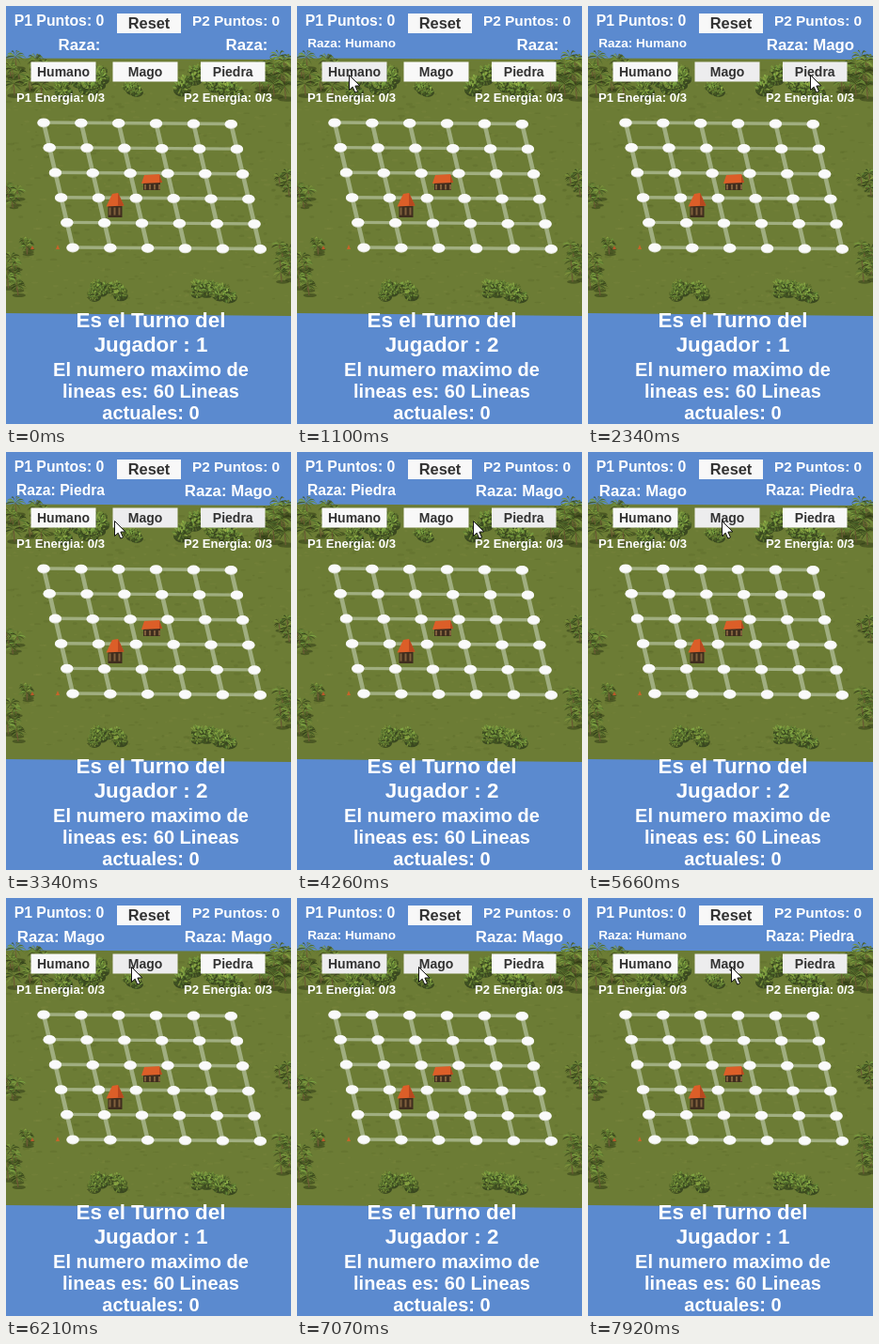
Write an HTML page with a canvas that moves like this. It is 303x445 px and loops after 8000 ms.

```html
<!DOCTYPE html>
<html lang="es">
<head>
<meta charset="utf-8">
<title>Puntos y lineas</title>
<style>
  html, body { margin: 0; width: 100%; height: 100%; overflow: hidden; background: #5b8acf; }
  canvas { display: block; width: 303px; height: 445px; }
</style>
</head>
<body>
<canvas id="stage"></canvas>
<script>
const W = 303, H = 445, LOOP = 8000, TICK = 77;
const SKY = '#5b8acf';
const ratio = window.devicePixelRatio || 1;

function setup(canvas) {
  canvas.width = W * ratio;
  canvas.height = H * ratio;
  const c = canvas.getContext('2d');
  c.scale(ratio, ratio);
  return c;
}

const ctx = setup(document.getElementById('stage'));
const scenery = document.createElement('canvas');

let seed = 11;
const random = () => (seed = (seed * 16807) % 2147483647) / 2147483647;
const between = (a, b) => a + (b - a) * random();

function polygon(c, fill, ...points) {
  c.beginPath();
  for (let i = 0; i < points.length; i += 2) c.lineTo(points[i], points[i + 1]);
  c.closePath();
  c.fillStyle = fill;
  c.fill();
}

function ellipse(c, fill, x, y, rx, ry, angle = 0) {
  c.beginPath();
  c.ellipse(x, y, rx, ry, angle, 0, 7);
  c.fillStyle = fill;
  c.fill();
}

// --- Scenery ---------------------------------------------------------

const leafColor = light => `hsl(${between(74, 88)}, 42%, ${17 + light * 29}%)`;

function palm(c, x, y, r) {
  ellipse(c, 'rgba(35,45,15,.45)', x + 2, y + r, r * .7, r * .2);
  c.strokeStyle = '#6b5a35';
  c.lineWidth = 1.2;
  c.beginPath();
  c.moveTo(x, y);
  c.lineTo(x + 1, y + r);
  c.stroke();
  const fronds = 15;
  for (let i = 0; i < fronds; i++) {
    const angle = i / fronds * Math.PI * 2 + between(-.2, .2);
    const dx = Math.cos(angle) * r * between(.7, 1.05);
    const dy = Math.sin(angle) * r * .6;
    c.beginPath();
    c.moveTo(x, y);
    c.quadraticCurveTo(x + dx * .6, y + dy - r * .3, x + dx, y + dy + r * .2);
    c.quadraticCurveTo(x + dx * .6, y + dy + 1.5 - r * .2, x, y);
    c.fillStyle = leafColor(random());
    c.fill();
  }
}

function bush(c, x, y, r) {
  ellipse(c, '#3a4820', x + 1, y + r * .25, r, r * .7);
  const leaves = 44;
  for (let i = 0; i < leaves; i++) {
    const angle = between(0, Math.PI * 2), reach = Math.sqrt(random()) * r;
    const dy = Math.sin(angle) * reach * .75;
    ellipse(c, leafColor(random() * .75 + .25 - dy / r * .25),
      x + Math.cos(angle) * reach, y + dy, r * .2, r * .09, angle);
  }
}

// Plants scattered in a box, the far ones first.
function grove(c, plant, x, y, w, h, count, size) {
  for (let i = 0; i < count; i++)
    plant(c, x + random() * w, y + h * i / count, size * between(.75, 1.15));
}

function plants(c) {
  for (const x of [2, W - 42]) grove(c, palm, x, 54, 40, 34, 13, 12);
  for (const x of [44, 186]) grove(c, bush, x, 68, 70, 24, 16, 9);
  grove(c, bush, 118, 84, 28, 8, 5, 7);
  for (const [x, lift] of [[0, 0], [W - 14, 14]]) {
    grove(c, palm, x, 192 - lift, 12, 20, 5, 9);
    grove(c, palm, x, 268 - lift, 18, 34, 8, 11);
  }
  grove(c, palm, 18, 249, 22, 9, 4, 8);
  for (const x of [78, 196]) grove(c, bush, x, 296, 44, 14, 9, 8);
}

function ground(c) {
  polygon(c, '#6c7c35', 0, 55.5, W, 57, W, 330, 0, 327);
  for (let i = 0; i < 700; i++)
    ellipse(c, i % 2 ? 'rgba(45,60,15,.09)' : 'rgba(165,170,90,.09)',
      between(0, W), between(62, 322), between(1, 4), between(.5, 1.5));
}

function board(c) {
  const N = 6;
  const node = (col, row) => [40 + col * 39.85 + row * 6.2, 124 + row * 26.6 + col * .3];
  const lines = (width, ends) => {
    c.lineWidth = width;
    c.beginPath();
    for (let i = 0; i < N; i++) {
      const [from, to] = ends(i);
      c.moveTo(...node(...from));
      c.lineTo(...node(...to));
    }
    c.stroke();
  };
  c.strokeStyle = '#a0ae80';
  lines(3.4, i => [[0, i], [N - 1, i]]);
  lines(4.6, i => [[i, 0], [i, N - 1]]);
  for (let row = 0; row < N; row++)
    for (let col = 0; col < N; col++) {
      const [x, y] = node(col, row);
      ellipse(c, '#d9dccf', x, y + .7, 6.7, 4.7);
      ellipse(c, '#fafafa', x, y - .1, 6.6, 4.5);
    }
}

// A hut standing on y, with its roof over the upper part.
function house(c, x, y, w, h, peak) {
  const left = x - w / 2, right = x + w / 2, eaves = y - h * .5, top = y - h;
  c.fillStyle = '#3f2d1e';
  c.fillRect(left + 1, eaves - 1, w - 2, y - eaves);
  c.fillStyle = '#80603d';
  for (let post = left + 2; post < right - 2; post += 5) c.fillRect(post, eaves + 2, 2, h * .3);
  polygon(c, '#dc5e28', x - peak, top + 1, x + peak, top, right + 1, eaves, left - 1, eaves + 1);
  polygon(c, '#b8481f', x + peak, top, right + 1, eaves, x + peak, eaves);
}

function buildScenery() {
  const c = setup(scenery);
  c.fillStyle = SKY;
  c.fillRect(0, 0, W, H);
  ground(c);
  plants(c);
  polygon(c, '#c8642a', 53, 259, 55, 254, 57, 259);
  polygon(c, '#b9572a', 26, 259, 28, 255, 30, 259);
  board(c);
  house(c, 155, 197, 20, 18, 8);
  house(c, 116, 226, 17, 27, 3);
}

// --- Interface -------------------------------------------------------

const BUTTONS = {
  Humano: { x: 26.5, y: 59.5, w: 69, h: 21, size: 14 },
  Mago: { x: 113.5, y: 59.5, w: 69, h: 21, size: 14 },
  Piedra: { x: 207, y: 59.5, w: 68.5, h: 21, size: 14 },
  Reset: { x: 118, y: 8, w: 68, h: 21, size: 16.4 }
};

// Where the pointer goes and when it presses there.
const VISITS = [
  { to: 'Humano', leave: 610, arrive: 780, clicks: [1020] },
  { to: 'Mago', leave: 1130, arrive: 1480, clicks: [1880] },
  { to: 'Piedra', leave: 1960, arrive: 2300, clicks: [2880] },
  { to: 'Humano', leave: 2960, arrive: 3530, clicks: [] },
  { to: 'Mago', leave: 3600, arrive: 3950, clicks: [] },
  { to: 'Piedra', leave: 4080, arrive: 4400, clicks: [4500] },
  { to: 'Mago', leave: 4750, arrive: 5150, clicks: [5240, 5900] },
  { to: 'Humano', leave: 6060, arrive: 6560, clicks: [6750] },
  { to: 'Piedra', leave: 6840, arrive: 7220, clicks: [7470] },
  { to: 'Mago', leave: 7600, arrive: 7916, clicks: [] }
];

// Players choose alternately, starting with player 1.
const CLICKS = VISITS.flatMap(({ to, clicks }) => clicks.map(at => ({ at, race: to })));

const ENTRY = { point: [235, 123], leave: 150, arrive: 460 };
const REST = [33, 81];

function spot(name) {
  const { x, y, w, h } = BUTTONS[name];
  return [x + w * .42, y + h * .65];
}

function pointerAt(t) {
  if (t < ENTRY.leave) return null;
  const glide = (from, to, { leave, arrive }) => {
    const k = Math.min(1, Math.max(0, (t - leave) / (arrive - leave)));
    const eased = k * k * (3 - 2 * k);
    return from.map((v, i) => v + (to[i] - v) * eased);
  };
  return VISITS.reduce((at, visit) => glide(at, spot(visit.to), visit),
    glide(ENTRY.point, REST, ENTRY));
}

function stateAt(t) {
  const done = CLICKS.filter(click => click.at <= t);
  const pressed = CLICKS.find(({ at }) => t >= at - 80 && t < at);
  const races = ['', ''];
  done.forEach(({ race }, i) => races[i % 2] = race);
  return {
    races,
    turn: done.length % 2 + 1,
    selected: done.length ? done[done.length - 1].race : '',
    pressed: pressed ? pressed.race : ''
  };
}

function label(text, x, baseline, size, align = 'center', color = '#fff') {
  ctx.font = `bold ${size}px "Liberation Sans", Arial, sans-serif`;
  ctx.textAlign = align;
  ctx.fillStyle = color;
  ctx.fillText(text, x, baseline);
}

function drawButton(name, state, pointer) {
  const { x, y, w, h, size } = BUTTONS[name];
  const hover = pointer && pointer[0] >= x && pointer[0] <= x + w &&
    pointer[1] >= y && pointer[1] <= y + h;
  ctx.fillStyle = name === state.pressed ? '#c8c8c8'
    : hover || name === state.selected ? '#ededee' : '#f8f8f8';
  ctx.fillRect(x, y, w, h);
  label(name, x + w / 2, y + h / 2 + size * .34, size, 'center', '#323232');
}

// Longer names are set smaller so that the line fits its box.
function drawRace(race, right) {
  const text = 'Raza: ' + race;
  ctx.font = 'bold 100px "Liberation Sans", Arial, sans-serif';
  const size = Math.min(16.8, 94 / ctx.measureText(text).width * 100);
  label(text, right, 34.5 + size * .72, size, 'right');
}

function drawPointer([x, y]) {
  ctx.save();
  ctx.translate(Math.round(x) + .5, Math.round(y) + .5);
  polygon(ctx, '#fff', 0, 0, 0, 16, 3.7, 12.7, 6.3, 18.6, 9, 17.4, 6.4, 11.6, 11.3, 11.4);
  ctx.strokeStyle = '#111';
  ctx.lineWidth = 1;
  ctx.stroke();
  ctx.restore();
}

function draw(t) {
  const state = stateAt(t), pointer = pointerAt(t);
  ctx.drawImage(scenery, 0, 0, W, H);
  label('P1 Puntos: 0', 56.5, 21, 15.8);
  label('P2 Puntos: 0', 244.5, 20.5, 15.4);
  drawRace(state.races[0], 105);
  drawRace(state.races[1], 283);
  Object.keys(BUTTONS).forEach(name => drawButton(name, state, pointer));
  label('P1 Energia: 0/3', 58, 102, 13.1);
  label('P2 Energia: 0/3', 236, 102, 13.1);
  label('Es el Turno del', 154, 342, 22.4);
  label('Jugador : ' + state.turn, 154, 368, 22.4);
  label('El numero maximo de', 154, 394, 20);
  label('lineas es: 60 Lineas', 154, 417, 20);
  label('actuales: 0', 154, 440, 20);
  if (pointer) drawPointer(pointer);
}

buildScenery();
const start = performance.now();

function frame() {
  const t = (performance.now() - start) % LOOP;
  draw(Math.floor(t / TICK) * TICK);
  requestAnimationFrame(frame);
}
frame();
</script>
</body>
</html>
```
